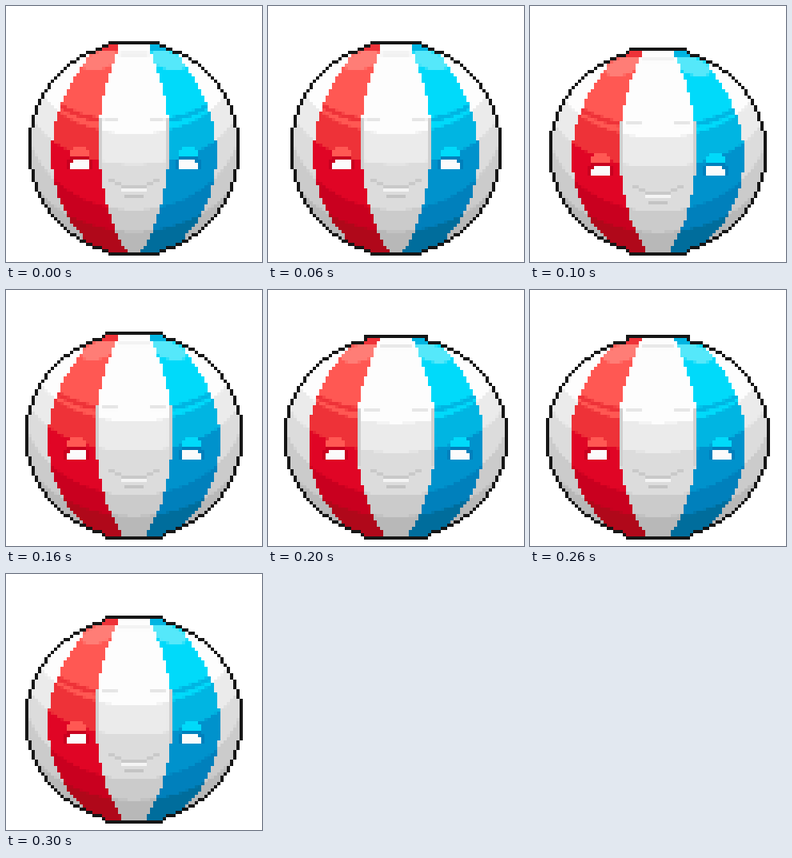
An HTML page without scripts for the animation above (400 ms loop, 320x320 px).

```html
<!DOCTYPE html>
<html lang="en">
<head>
<meta charset="utf-8">
<title>Bouncing beach ball</title>
<style>
  html, body { margin: 0; width: 100%; height: 100%; overflow: hidden; background: #fff; }
  svg { display: block; width: 100%; height: 100%; shape-rendering: crispEdges; }

  .ball, .cap, .edge, .eye, .mouth { animation: .4s step-end infinite; }
  .ball { animation-name: squash; }
  .cap { animation-name: flatten; }
  .edge { animation-name: bulge; }
  .eye.red { animation-name: eye-left; }
  .eye.blue { animation-name: eye-right; }
  .mouth { animation-name: mouth; }

  .white { --light: #fdfdfd; --mid: #ebebeb; --low: #dcdcdc; --deep: #cbcbcb; --base: #b8b8b8; }
  .red { --shine: #ff7d76; --light: #ff5853; --mid: #ee3238; --low: #e00525; --deep: #c9001f; --base: #b0081a; }
  .blue { --shine: #55e8fa; --light: #00dafa; --mid: #00b5e2; --low: #0092cc; --deep: #0080bc; --base: #006d9c; }

  @keyframes squash {
    0% { transform: translate(160.5px, 312.5px); }
    25%, 75% { transform: translate(160.5px, 312.5px) scale(1.0303, .97); }
    50% { transform: translate(160.5px, 312.5px) scale(1.0606, .955); }
  }
  @keyframes flatten {
    0% { transform: none; }
    25%, 75% { transform: scaleX(1.09); }
    50% { transform: scaleX(1.18); }
  }
  @keyframes bulge {
    0% { d: path("M-42-268C-72-232-103-184-103-128C-103-72-76-22-32 0H-6C-26-30-44-80-44-148C-44-196-26-242-16-268Z"); }
    25%, 50%, 75% { d: path("M-42-268C-74-232-104-184-104-128C-104-72-76-22-32 0H-10C-31-31-46.6-76-46.6-144C-46.6-181-35-227-17-268Z"); }
  }
  @keyframes eye-left {
    0% { transform: translate(92px, 192px); }
    25%, 75% { transform: translate(88px, 200px); }
    50% { transform: translate(84px, 200px); }
  }
  @keyframes eye-right {
    0% { transform: translate(228px, 192px); }
    25%, 75% { transform: translate(232px, 200px); }
    50% { transform: translate(240px, 200px); }
  }
  @keyframes mouth {
    0% { transform: translate(160px, 216px); }
    25%, 50%, 75% { transform: translate(160px, 224px); }
  }
</style>
</head>
<body>
<svg viewBox="0 0 320 320">
  <defs>
    <!-- Snaps the drawing to 4px cells, then inks the outermost cells -->
    <filter id="pixels" filterUnits="userSpaceOnUse" x="0" y="0" width="320" height="320" color-interpolation-filters="sRGB">
      <feComponentTransfer in="SourceGraphic" result="solid">
        <feFuncA type="discrete" tableValues="0 1"/>
      </feComponentTransfer>
      <feFlood x="2" y="2" width="1" height="1" result="dot"/>
      <feComposite in="dot" in2="dot" operator="over" x="0" y="0" width="4" height="4" result="cell"/>
      <feTile in="cell" result="grid"/>
      <feComposite in="solid" in2="grid" operator="in" result="dots"/>
      <feOffset in="dots" dx="-1" dy="0" result="dotsLeft"/>
      <feMerge result="pairs"><feMergeNode in="dots"/><feMergeNode in="dotsLeft"/></feMerge>
      <feOffset in="pairs" dx="0" dy="-1" result="pairsUp"/>
      <feMerge result="quads"><feMergeNode in="pairs"/><feMergeNode in="pairsUp"/></feMerge>
      <feMorphology in="quads" operator="dilate" radius="1" result="art"/>
      <feOffset in="art" dx="4" dy="0" result="east"/>
      <feOffset in="art" dx="-4" dy="0" result="west"/>
      <feOffset in="art" dx="0" dy="4" result="south"/>
      <feOffset in="art" dx="0" dy="-4" result="north"/>
      <feComposite in="art" in2="east" operator="in" result="in1"/>
      <feComposite in="in1" in2="west" operator="in" result="in2"/>
      <feComposite in="in2" in2="south" operator="in" result="in3"/>
      <feComposite in="in3" in2="north" operator="in" result="inside"/>
      <feFlood flood-color="#161616" result="ink"/>
      <feComposite in="ink" in2="art" operator="in" result="outline"/>
      <feMerge><feMergeNode in="outline"/><feMergeNode in="inside"/></feMerge>
    </filter>

    <filter id="hard" filterUnits="userSpaceOnUse" x="0" y="0" width="320" height="320" color-interpolation-filters="sRGB">
      <feComponentTransfer><feFuncA type="discrete" tableValues="0 1"/></feComponentTransfer>
    </filter>

    <clipPath id="round">
      <ellipse cy="-134" rx="132.6" ry="134"/>
      <rect class="cap" x="-32" y="-268" width="64" height="268"/>
    </clipPath>
    <clipPath id="stripe"><path class="edge"/></clipPath>

    <!-- Light from above, in bands -->
    <g id="shade">
      <rect x="-150" y="-280" width="300" height="290" style="fill:var(--base)"/>
      <ellipse cy="-160" rx="150" ry="130" style="fill:var(--deep)"/>
      <ellipse cy="-175" rx="135" ry="118" style="fill:var(--low)"/>
      <ellipse cy="-196" rx="132" ry="82" style="fill:var(--mid)"/>
      <ellipse cy="-230" rx="122" ry="78" style="fill:var(--light)"/>
    </g>
    <g id="panel" clip-path="url(#round)">
      <g clip-path="url(#stripe)">
        <use href="#shade"/>
        <path d="M-100-192Q-74-174-40-169" fill="none" stroke-width="6" style="stroke:var(--mid)"/>
        <ellipse rx="23" ry="11" transform="translate(-42 -244) rotate(-20)" style="fill:var(--shine)"/>
        <ellipse cy="-268" rx="60" ry="14" style="fill:var(--mid)"/>
      </g>
    </g>

    <g id="fold" fill="#d0d0d0">
      <path d="M-60-172H-41.4V-96H-60Z"/>
      <path d="M-38-172H-20V-168H-38Z" fill="#e6e6e6"/>
    </g>
    <g id="eye">
      <path d="M-12-4V-12H-8V-16H8V-12H12V-4Z" style="fill:var(--light)"/>
      <path d="M-16 12V0H-12V-4H12V0H16V12Z" style="fill:var(--deep)"/>
      <path d="M-12 12V4H-8V0H12V12Z" fill="#fbfbfb"/>
    </g>
  </defs>

  <g filter="url(#pixels)">
    <g class="ball white">
      <g clip-path="url(#round)">
        <use href="#shade"/>
        <path d="M-18-252H18" stroke="#e8e8e8" stroke-width="4"/>
        <use href="#fold"/>
        <use href="#fold" transform="scale(-1 1)"/>
      </g>
    </g>
    <g class="red" filter="url(#hard)">
      <g class="ball"><use href="#panel"/></g>
    </g>
    <g class="blue" filter="url(#hard)">
      <g class="ball"><use href="#panel" transform="scale(-1 1)"/></g>
    </g>

    <g class="eye red"><use href="#eye"/></g>
    <g class="eye blue"><use href="#eye" transform="scale(-1 1)"/></g>
    <g class="mouth">
      <path d="M-32 0H-24V4H-16V8H16V4H24V0H32V4H24V8H16V12H-16V8H-24V4H-32Z" fill="#c9c9c9"/>
      <path d="M-16 12H16V16H-16Z" fill="#f4f4f4"/>
      <path d="M-12 20H12V24H-12Z" fill="#c4c4c4"/>
    </g>
  </g>
</svg>
</body>
</html>
```
